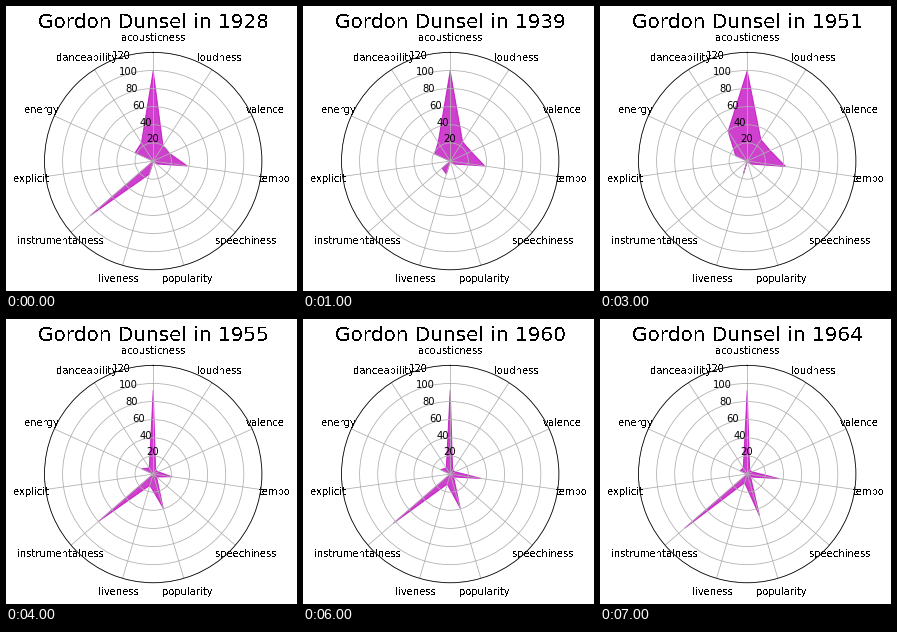
Recreate the animation shown at these times as a matplotlib script. Size 291 px wide and 285 px high, loop 8 s.

```python
from math import cos, sin

import numpy as np
import matplotlib.pyplot as plt
from matplotlib.animation import FuncAnimation

W, H, DPI = 291, 285, 72
CX, CY, R = 147.2, 155.05, 108.72
NAME = "Gordon Dunsel"
YEARS = [1928, 1939, 1945, 1951, 1955, 1957, 1960, 1964]
LATE = YEARS.index(1955)

LABELS = ["acousticness", "danceability", "energy", "explicit",
          "instrumentalness", "liveness", "popularity", "speechiness",
          "tempo", "valence", "loudness"]
ANGLES = np.arange(len(LABELS)) * 2 * np.pi / len(LABELS)


def early(k):
    """Songs: calm and danceable, with a swinging mood."""
    mood = 19 + 10.5 * sin(2.4 * k + 0.1)
    return dict(acousticness=99.5, danceability=24 + 15 * (k / 3) ** 3,
                energy=22 * 0.86 ** k, instrumentalness=92 * 0.13 ** k,
                liveness=15, popularity=0.5, tempo=38 + 0.55 * k ** 2,
                valence=mood, loudness=mood)


def late(k):
    """Orchestral works: instrumental, with popularity rising and falling."""
    return dict(acousticness=92.5, danceability=8, energy=14 - 0.6 * k ** 2,
                instrumentalness=79.5 + 0.44 * k ** 3,
                liveness=13 - k ** 2 / 3,
                popularity=33 + 19 * cos(1.9 * k + 1.24),
                tempo=36 - 15 * 0.25 ** k, valence=6, loudness=5)


def values(i):
    mix = early(i) if i < LATE else late(i - LATE)
    mix.update(explicit=0, speechiness=5)
    return [mix[label] for label in LABELS]


fig = plt.figure(figsize=(W / DPI, H / DPI), dpi=DPI, facecolor="white")
ax = fig.add_axes([(CX - R) / W, (H - CY - R) / H, 2 * R / W, 2 * R / H],
                  projection="polar")
ax.set_theta_zero_location("N")
ax.set_thetagrids(np.degrees(ANGLES), LABELS)
ax.set_ylim(0, 120)
ax.set_yticks(range(20, 121, 20))

area, = ax.fill(ANGLES, values(0), color="m", alpha=0.75)
title = fig.text(CX / W, 1 - 22.4 / H, "", size=20, ha="center",
                 va="baseline")

# Lettering outside the disc has hard edges.
for text in [title, *ax.get_xticklabels(), ax.get_yticklabels()[-1]]:
    text.set_antialiased(False)


def draw(i):
    area.set_xy(np.column_stack([ANGLES, values(i)]))
    title.set_text(f"{NAME} in {YEARS[i]}")
    return area, title


anim = FuncAnimation(fig, draw, frames=len(YEARS), interval=1000,
                     init_func=lambda: draw(0), repeat=True, repeat_delay=0)
plt.show()
```
